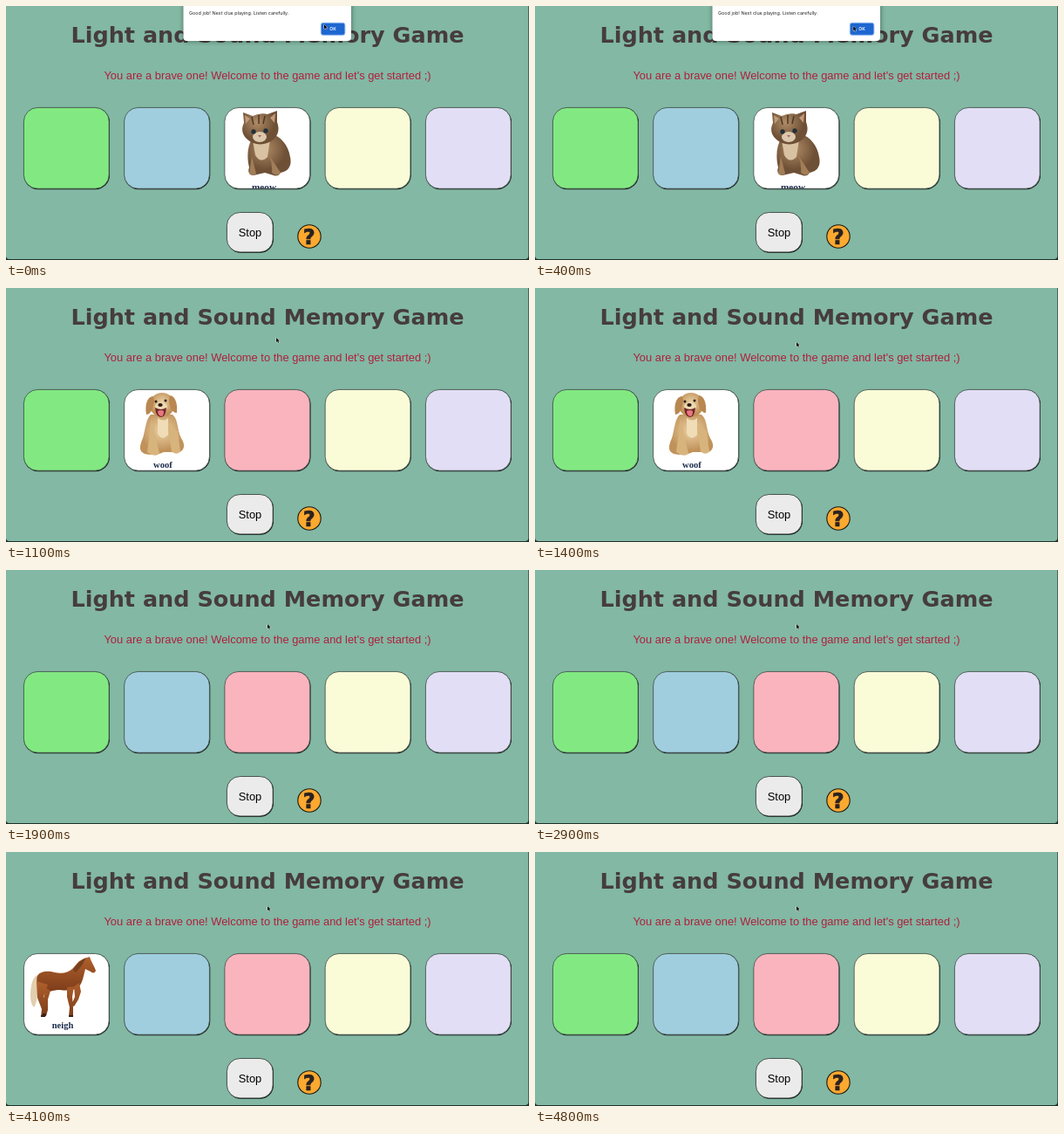
Animation of 600x291 px, one loop 5000 ms. Source, as an HTML page:

```html
<!DOCTYPE html>
<html lang="en">
<head>
<meta charset="utf-8">
<title>Memory Game</title>
<style>
  html, body { margin: 0; width: 100%; height: 100%; overflow: hidden; background: #20302b; }
  svg { display: block; width: 100%; height: 100%; }
  text { font-family: "Liberation Sans", Arial, sans-serif; }
  .mid { text-anchor: middle; }
  .bold { font-family: "DejaVu Sans", Verdana, sans-serif; font-weight: bold; }
  .sound { font: bold 10.6px "Liberation Serif", Times, serif; fill: #1c2c4c; text-anchor: middle; }
  .photo { filter: blur(.5px); }
  .ui { font-family: Inter, sans-serif; }
</style>
</head>
<body>
<svg viewBox="0 0 600 291" preserveAspectRatio="none">
  <defs>
    <clipPath id="catClip"><rect x="251" y="116.5" width="97.5" height="92.5" rx="16"/></clipPath>
    <radialGradient id="catFur" cx=".4" cy=".35"><stop stop-color="#b08c66"/><stop offset="1" stop-color="#6e5036"/></radialGradient>
    <radialGradient id="dogFur" cx=".5" cy=".4"><stop stop-color="#ecd2a6"/><stop offset="1" stop-color="#c0925a"/></radialGradient>
    <linearGradient id="horseFur" x2="0" y2="1"><stop stop-color="#b0602c"/><stop offset="1" stop-color="#7c3c1a"/></linearGradient>
  </defs>

  <path d="M0 0H599.4V286a4 4 0 0 1-4 4H4a4 4 0 0 1-4-4Z" fill="#82b8a4"/>
  <text class="mid bold" x="300" y="42" font-size="25.5" fill="#463c3f">Light and Sound Memory Game</text>
  <text class="mid" x="300" y="84.3" font-size="12.9" fill="#b01f3d">You are a brave one! Welcome to the game and let's get started ;)</text>
  <g id="cards"></g>

  <g id="horse">
    <g class="photo" fill="url(#horseFur)">
      <path d="M36 141C31 143 28 152 28 164q0 10 4 14 4-6 4-16Z" fill="#e2cfae"/>
      <path d="M36 142c3-6 13-6 20-4 9 2 15 0 20-4 4-4 7-10 14-12l6-2 1 3c2 5 5 9 6 13-1 3-4 3-6 1l-6-3c-2 8-3 15-7 20-6 5-14 5-22 4-10 0-14 4-20 2-6-3-8-12-6-18Z"/>
      <path d="M35 148l13 4-5 14 3 14-1 9h-5l1-9-5-13ZM46 156l5 3-3 10 0 12-2 7h-4l2-8-1-12ZM70 155l8-1-2 12 1 12 0 11h-5l1-11-3-12ZM78 154l6-4 2 10-3 9-5 8-3-2 4-9Z"/>
      <path d="M77 135q6-10 15-14l-5 9-7 8Z" fill="#77401f"/>
      <path d="M40 187h5v2h-5ZM72 187h5v2h-5ZM42 185h4v2h-4Z" fill="#392216"/>
    </g>
    <text class="sound" x="65" y="202">neigh</text>
  </g>

  <g id="dog">
    <g class="photo" fill="url(#dogFur)">
      <path d="M166 145c-6 6-6 18-9 27-4 9-5 15 2 18 8 2 16 1 22-2l18 0c7-3 6-10 2-16-5-10-3-21-10-27Z"/>
      <path d="M167 150l9 39q-2 4-9 2l-5-3ZM185 155l5 32q4 5 10 1l-3-24Z" fill="#d8b47d"/>
      <path d="M174 149q7 5 12 0l0 19q-7 8-12-1Z" fill="#f0dcb6"/>
      <ellipse cx="179" cy="134" rx="14" ry="14"/>
      <path d="M169 124c-7 0-10 10-8 21 6 0 8-9 9-16ZM188 123c7 1 9 11 8 20-6 0-9-8-9-15Z" fill="#b98750"/>
      <ellipse cx="178" cy="136" rx="7" ry="5" fill="#efd9b2"/>
      <path d="M171 137q7 4 13 0-1 11-6 11-6 0-7-11Z" fill="#6d2527"/>
      <path d="M174 141q4-2 7 0 0 6-3 6-4-1-4-6Z" fill="#e87882"/>
      <g fill="#2a1b14"><ellipse cx="177" cy="134" rx="2.7" ry="2"/><circle cx="172" cy="130" r="1.5"/><circle cx="183" cy="129" r="1.5"/></g>
    </g>
    <text class="sound" x="180" y="206">woof</text>
  </g>

  <g id="cat" clip-path="url(#catClip)">
    <g class="photo" fill="url(#catFur)">
      <path d="M283 151c-6 9-7 21-4 34-2 5 0 9 5 9l13-3 10 3q5 2 8-3c10-2 13-9 11-18-2-14-11-23-20-26Z"/>
      <path d="M283 154q10 8 20-1l-3 20q-8 8-14-2Z" fill="#d8c2a2"/>
      <path d="M282 172l5 20q-4 4-8 0ZM302 171q4 10 3 20 6 5 10 0Z" fill="#a17d58"/>
      <path d="M272 122l11 4q9-4 17-2l11-4 0 13c4 10 0 19-9 23-8 4-19 3-25-3-7-6-7-13-4-19Z"/>
      <path d="M274 125l6 4-5 6ZM309 123l-6 5 5 6Z" fill="#c29a7c"/>
      <path d="M282 127l2 9M290 125l0 10M297 126l-2 9" stroke="#4d3826" stroke-width="1.5"/>
      <ellipse cx="291" cy="150" rx="8" ry="6" fill="#dcc8ac"/>
      <g fill="#24303a"><circle cx="284" cy="144" r="2.7"/><circle cx="298" cy="143" r="2.7"/></g>
      <path d="M289 148h4l-2 2.5Z" fill="#a65f57"/>
    </g>
    <text class="sound" x="296" y="211" style="font-size:11.2px">meow</text>
  </g>

  <rect x="253.8" y="237" width="53.2" height="45.8" rx="15.5" fill="#111"/>
  <rect x="253.4" y="236.5" width="52.8" height="45.4" rx="15" fill="#ebebeb" stroke="#2b3330" stroke-width=".8"/>
  <text class="mid" x="280" y="264" font-size="12.9">Stop</text>
  <circle cx="348" cy="264" r="13.2" fill="#fba92f" stroke="#1c1712" stroke-width="1.1"/>
  <text class="mid bold" x="347.8" y="273" font-size="24" fill="#2a2220" stroke="#2a2220" stroke-width=".7">?</text>

  <g id="dialog">
    <rect x="203" y="-12" width="194" height="53" rx="5" style="filter:blur(2.5px)" fill="#000" opacity=".35"/>
    <rect x="203.5" y="-12" width="192.5" height="52" rx="4" fill="#fff"/>
    <text class="ui" x="210" y="10.2" font-size="5.45" fill="#222">Good job! Next clue playing. Listen carefully.</text>
    <rect x="361.3" y="19.3" width="27.6" height="14" rx="2.6" fill="#1e66d0" stroke="#8db6ee"/>
    <text class="mid ui" x="375" y="28.1" font-size="5" font-weight="600" fill="#fff">OK</text>
  </g>
  <path id="cursor" d="M0 0V5.2L1.2 4.1 2 6 2.9 5.6 2.1 3.8H3.7Z" stroke="#fff" stroke-width=".8" paint-order="stroke"/>
</svg>
<script>
const LOOP = 5000;
const $ = id => document.getElementById(id);
const colors = ['#82e982', '#a0cedf', '#fab4be', '#fafcd8', '#e2def5'];

$('cards').innerHTML = colors.map((color, i) => {
  const x = 20.4 + i * 115.25;
  return `<rect x="${x}" y="116.6" width="98.6" height="93.6" rx="16.5" fill="#111"/>
    <rect x="${x}" y="116.4" width="97.8" height="92.8" rx="16" fill="${color}" stroke="#46544e" stroke-width=".8"/>`;
}).join('');
const faces = [...$('cards').children].filter((_, i) => i % 2);

// Each clue: picture, card index, and the spans it is lit
const clues = [
  ['horse', 0, [[3700, 4400]]],
  ['dog', 1, [[800, 1500]]],
  ['cat', 2, [[0, 700], [2200, 2900]]]
];
// Pointer path: time, x, y
const path = [[0, 365, 21], [300, 365, 21], [600, 366, 29], [800, 366, 29], [1200, 300, 62], [LOOP, 300, 62]];

const show = (el, on) => el.setAttribute('visibility', on ? 'visible' : 'hidden');

function pointerAt(t) {
  const i = path.findIndex(p => p[0] > t);
  const [t0, x0, y0] = path[i - 1], [t1, x1, y1] = path[i];
  const k = (t - t0) / (t1 - t0), e = k * k * (3 - 2 * k);
  return [x0 + (x1 - x0) * e, y0 + (y1 - y0) * e];
}

function draw(t) {
  for (const [id, card, spans] of clues) {
    const lit = spans.some(([a, b]) => t >= a && t < b);
    show($(id), lit);
    faces[card].setAttribute('fill', lit ? '#fff' : colors[card]);
  }
  const closing = t >= 700;
  show($('dialog'), t < 800);
  $('dialog').setAttribute('opacity', closing ? .6 : 1);
  $('dialog').setAttribute('transform', closing ? 'translate(6 -3.2) scale(.98)' : '');
  $('cursor').setAttribute('transform', `translate(${pointerAt(t)})`);
}

const start = performance.now();
function tick() {
  draw((performance.now() - start) % LOOP);
  requestAnimationFrame(tick);
}
tick();
</script>
</body>
</html>
```
